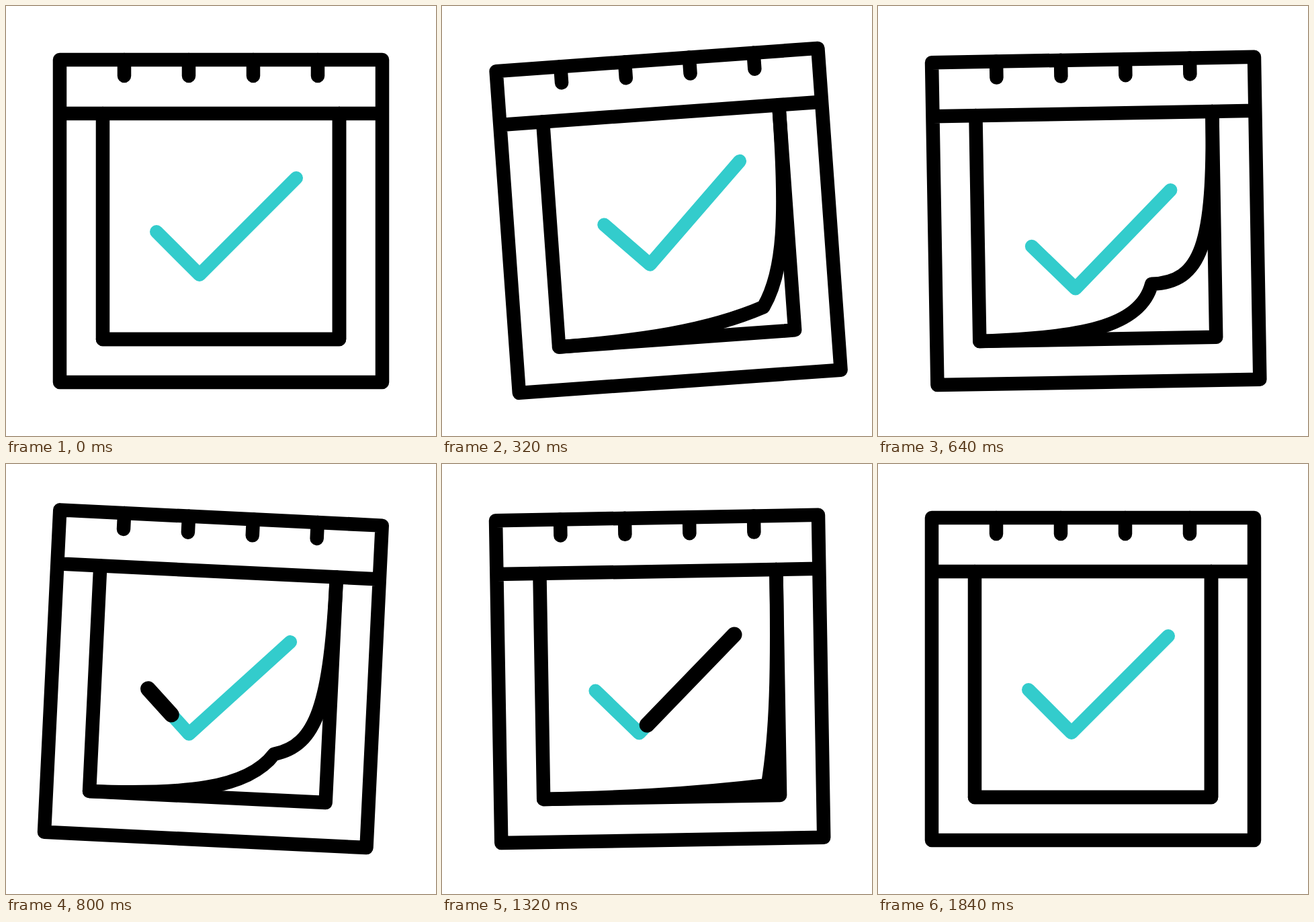
Animation, 640 px wide and 640 px high, one loop 2 s. Source, as an HTML page:

```html
<!DOCTYPE html>
<html lang="en">
<head>
<meta charset="utf-8">
<title>Calendar check</title>
<style>
  html, body { margin: 0; width: 100%; height: 100%; overflow: hidden; background: #fff; }
  svg { display: block; width: 100vw; height: 100vh; }
  path { fill: none; stroke: #000; stroke-width: 20.5; stroke-linecap: round; stroke-linejoin: round; }
  #tick { stroke: #3cc; stroke-width: 20; }
  #trace { stroke-width: 23; }
</style>
</head>
<body>
<svg viewBox="0 0 640 640">
  <g id="calendar">
    <path d="M80 80H560V560H80ZM80 160H560"/>
    <path id="rings"/>
    <path d="M144 160V496H496V160"/>
    <path id="curl"/>
    <g id="mark">
      <path id="tick" d="M224 336l64 64 144-144"/>
      <path id="trace" d="M224 336l64 64 144-144" pathLength="1"/>
    </g>
  </g>
</svg>
<script>
  const LOOP = 2000, STEP = 40;
  const LEFT = 144, TOP = 160, CORNER = 496;

  const el = id => document.getElementById(id);
  const calendar = el('calendar'), curl = el('curl'), mark = el('mark'), trace = el('trace');
  const mix = (a, b, k) => a + (b - a) * k;

  // Smooth rise from 0 to 1 between two times.
  function ramp(t, from, to) {
    const p = Math.min(1, Math.max(0, (t - from) / (to - from)));
    return p * p * (3 - 2 * p);
  }

  // Page edge down the right side, round the lifted corner, along the bottom.
  function curlPath(k) {
    const right = (u, dx, dy) => [CORNER + dx * k, mix(TOP, CORNER, u) + dy * k];
    const bottom = (u, dx, dy) => [mix(CORNER, LEFT, u) + dx * k, CORNER + dy * k];
    const tip = right(1, -95.5, -81.5);
    return `M${CORNER} ${TOP}` +
      `C${right(0.42, 0, 59)} ${right(0.72, -21, 12)} ${tip}` +
      `C${bottom(0.42, 36, -16)} ${bottom(0.72, 47, -2)} ${LEFT} ${CORNER}`;
  }

  function draw(t) {
    // The calendar swings ever less; the mark hops up, down and back.
    const angle = -5 * ramp(t, 0, 440) + 8 * ramp(t, 440, 840)
      - 4 * ramp(t, 840, 1280) + ramp(t, 1280, 1840);
    const lift = -20.5 * ramp(t, 0, 440) + 40.5 * ramp(t, 440, 640) - 20 * ramp(t, 640, 860);
    const fold = 1.07 * (ramp(t, 220, 440) - ramp(t, 440, 1640));
    const head = ramp(t, 640, 1240), tail = ramp(t, 960, 1840);

    calendar.setAttribute('transform', `rotate(${angle} 320 80)`);
    mark.setAttribute('transform', `translate(0 ${lift})`);
    curl.setAttribute('d', curlPath(fold));
    trace.style.display = head > tail ? '' : 'none';
    trace.setAttribute('stroke-dasharray', `${head - tail} 2`);
    trace.setAttribute('stroke-dashoffset', -tail);
  }

  let rings = '';
  for (let i = 0; i < 4; i++) rings += `M${176 + 96 * i} 80v24`;
  el('rings').setAttribute('d', rings);

  const begin = performance.now();
  function tick() {
    const t = (performance.now() - begin) % LOOP;
    draw(Math.floor(t / STEP) * STEP);
    requestAnimationFrame(tick);
  }
  tick();
</script>
</body>
</html>
```
